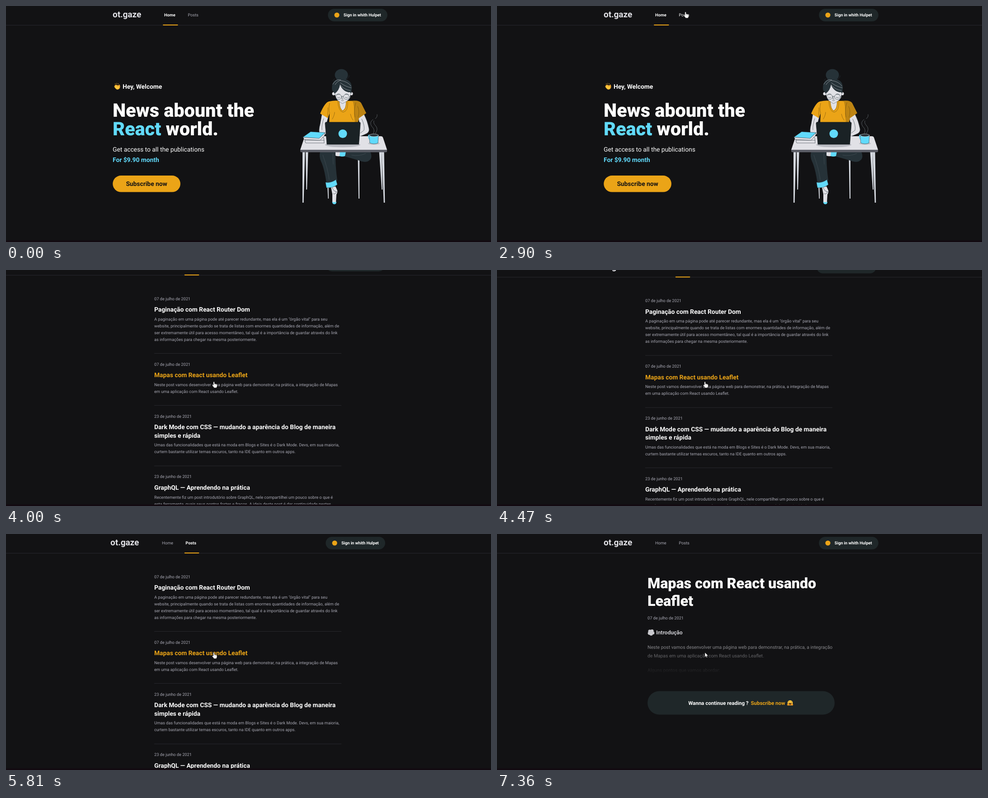
These frames come from a looping animation (1073x522 px, 8 s). An HTML page:

```html
<!DOCTYPE html>
<html lang="pt">
<head>
<meta charset="utf-8">
<title>ot.gaze</title>
<style>
  html, body { margin: 0; width: 100%; height: 100%; overflow: hidden; background: #121214; }
  svg { display: block; width: 100vw; height: 100vh; }
  text { font-family: Roboto, Arial, sans-serif; text-rendering: geometricPrecision; white-space: pre; }
</style>
</head>
<body>
<svg id="stage" viewBox="0 0 1073 522" xmlns="http://www.w3.org/2000/svg">
  <defs>
    <linearGradient id="fade" gradientUnits="userSpaceOnUse" x1="0" y1="206" x2="0" y2="310">
      <stop offset="0" stop-color="#e1e1e6"/>
      <stop offset="1" stop-color="#e1e1e6" stop-opacity="0"/>
    </linearGradient>
    <g id="desk-scene" stroke-linejoin="round" stroke-linecap="round">
      <!-- chair and table legs -->
      <g fill="#d5d9e0">
        <path d="M778.500 338h3.500l0 88h-2z M711 398h2.600l.4 28h-1.600z"/>
        <path d="M663 322h5.500l-2.500 84h-1.800z M825.500 322h5.500l2 84h-1.800z"/>
        <path d="M656 322h5.500l-3 113h-2.600z M831 322h5.500l1.800 113h-2.600z"/>
      </g>
      <!-- legs -->
      <path fill="#263238" d="M750 322H806Q812 336 803 342Q796 348 779 341L750 333Z"/>
      <path fill="#e1e1e6" d="M728 322h12l-1 10q-6 1-10-1z"/>
      <path fill="#61dafb" d="M739 322h13l-2 10q-6 2-12 0z"/>
      <path fill="#263238" d="M695 322H729Q728 350 733 386L709 392Q704 358 697 344Q692 333 695 322Z"/>
      <path fill="none" stroke="#4a575d" stroke-width=".6" d="M701 330Q712 360 715 384M723 327L724 350M765 330Q782 333 796 326"/>
      <path fill="#e1e1e6" d="M719 401l10-2 4 9q1 4-2 9l-1 17q-4 3-8 0l0-18z"/>
      <path fill="none" stroke="#263238" stroke-width=".7" d="M722 402q2 8 10 9M724 415q3 3 7-3"/>
      <path fill="#61dafb" d="M721.500 433q4.500 2 9.500 0q0 5-4 5.500q-5 0-5.500-5.500z"/>
      <path fill="#61dafb" stroke="#263238" stroke-width=".5" d="M707 390q12 2 23-6l3 11q-9 8-24 7z"/>
      <!-- arms -->
      <g fill="#e1e1e6" stroke="#263238" stroke-width=".6">
        <path d="M699 239l14 7q-5 14-4 26l-1 12-14-1q-3-8 1-22z"/>
        <path d="M779 247l13-8q8 16 11 32q2 9-9 13l-12 5-1-15q3-12-2-27z"/>
        <path fill="none" d="M703 249q-5 14-4 25M787 250q7 14 5 25l-8 6"/>
      </g>
      <!-- shirt -->
      <path fill="#bd8413" d="M760 210Q782 207 786 215L797 237 781 248 778 260H766Z"/>
      <path fill="#eba417" d="M715 211Q728 208 738 210H752Q764 209 768 212Q771 226 770 238L772 260H715L716 237 712 248 695 238Q706 212 715 211Z"/>
      <path fill="none" stroke="#6b4a0b" stroke-width=".6" d="M716 215q-3 12 0 22M711 246q2-15 1-21M774 214q-5 12-2 32M778 222q5 10 1 24M722 250q5-9 5-15M768 253q-5-7-6-14"/>
      <path fill="#e1e1e6" d="M738 208V214Q739 228 745 231Q752 227 752 213V208Z"/>
      <path fill="none" stroke="#7c5810" stroke-width=".7" d="M737 210Q738 229 745 232Q753 229 753 210M734 211Q736 234 746 235Q757 233 756 211"/>
      <!-- head -->
      <circle cx="725" cy="194" r="3.500" fill="#e1e1e6"/>
      <circle cx="764" cy="194" r="3.500" fill="#e1e1e6"/>
      <path fill="#e1e1e6" stroke="#37444a" stroke-width=".5" d="M727 184Q727 202 734 209L744 216Q756 211 761 203L764 184 739 174Z"/>
      <ellipse cx="742" cy="152.500" rx="14.500" ry="13" fill="#263238"/>
      <path fill="#263238" d="M721 182Q721 160 742 161Q765 161 765 181L764 194Q761 189 759 191Q745 189 739 174Q737 187 727 194L725 190Q721 188 721 182Z"/>
      <path fill="none" stroke="#263238" stroke-width=".8" d="M754 161q5-2 5-7M727 161l-4 4"/>
      <path fill="none" stroke="#c9ccd1" stroke-width=".6" d="M723 173Q731 160 741 164Q733 166 728 174M741 165Q756 167 763 177M740 170Q750 178 764 181M739 174Q747 185 762 187"/>
      <g fill="none" stroke="#37444a" stroke-width=".7">
        <ellipse cx="736" cy="201" rx="6.500" ry="5.500"/>
        <ellipse cx="753" cy="201" rx="6.500" ry="5.500"/>
        <path d="M742 200q2-1 4.500 0M731 196q4-3 8-1M750 195q4-2 8 1M733 202q3 2 6 0M750 202q3 2 6 0M744 201l-1 5h3M742 209q3 1 5 0"/>
      </g>
      <!-- table -->
      <path fill="#e1e1e6" d="M664 288H829Q833 288 834 291L843 318H651L660 291Q661 288 664 288Z"/>
      <path fill="#5b5d66" d="M651 318H843V321Q843 323.500 840 323.500H654Q651 323.500 651 321Z"/>
      <ellipse cx="745" cy="307" rx="39" ry="5.500" fill="#b9bbc2"/>
      <ellipse cx="814" cy="304" rx="13" ry="3" fill="#c2c4ca"/>
      <!-- laptop -->
      <path fill="#1a2225" stroke="#0f1517" stroke-width=".7" d="M708 257H782Q784.500 257 784 260L780.500 306H710L706 260Q706 257 708 257Z"/>
      <circle cx="745" cy="282.500" r="9.500" fill="#61dafb"/>
      <!-- books -->
      <g stroke="#263238" stroke-width=".6">
        <path fill="#e1e1e6" d="M662 293L703 291 704 303H663Q660 298 662 293Z"/>
        <path fill="none" d="M662 297H704"/>
        <path fill="#e1e1e6" d="M657 290L693 292 706 280 705 286 695 297 660 295Z"/>
        <path fill="#61dafb" d="M657 290L674 278 706 280 693 292.500Z"/>
      </g>
      <!-- mug and steam -->
      <path fill="none" stroke="#61dafb" stroke-width="2" d="M806 286q-5-2-4 4q1 6 6 6"/>
      <path fill="#61dafb" stroke="#263238" stroke-width=".6" d="M804 286H824L823 303Q814 307 805 303Z"/>
      <ellipse cx="814" cy="286" rx="10" ry="3" fill="#263238" stroke="#e1e1e6" stroke-width=".7"/>
      <path fill="none" stroke="#71797d" stroke-width=".7" d="M812 283Q818 274 809 266Q803 257 812 251M817 249Q822 246 821 240M817 282Q825 272 817 264Q812 259 814 254"/>
    </g>
    <g id="clap">
      <path fill="#f0a32b" d="M241 175.500L244 174 249 176 250 173.500Q252.500 174 252.500 179Q252 184 247 184.500Z"/>
      <path fill="#ffc83d" stroke="#c87a12" stroke-width=".4" d="M239.300 178Q239.500 176.600 241 177.500L240.600 175.500Q241.500 174 243 175.300L247.500 178.300 248 175.600Q250 175 251 178.500Q251.500 184 246.500 184.800Q243 184.500 239.300 178Z"/>
      <path stroke="#ffc83d" stroke-width="1" fill="none" d="M241.500 171.500l.8 1.500M245 170.500v1.700M248.600 171.300l-.8 1.600"/>
    </g>
    <g id="hug">
      <circle cx="648.500" cy="373.500" r="5.800" fill="#ffc83d"/>
      <path d="M645 374h7q0 4-3.500 4t-3.500-4z" fill="#6b3d14"/>
      <path d="M645 372q1-2 2.200 0M650 372q1-2 2.200 0" fill="none" stroke="#6b3d14" stroke-width=".8"/>
      <ellipse cx="644.500" cy="377.500" rx="2.600" ry="2" fill="#f59b23"/>
      <ellipse cx="652.500" cy="377.500" rx="2.600" ry="2" fill="#f59b23"/>
    </g>
  </defs>
  <g id="home"></g>
  <g id="posts"></g>
  <g id="post"></g>
  <rect y="518.500" width="1073" height="3.500" fill="#120a10"/>
  <circle id="press" r="7" fill="#ff0" fill-opacity=".47"/>
  <g id="arrow">
    <path d="M0 0V10.200L2.400 8 4 11.300 5.500 10.600 4 7.400H7.200Z" fill="#fff" stroke="#000" stroke-width=".5"/>
  </g>
  <g id="hand">
    <path d="M-1.300 1Q-1.300 0 0 0T1.300 1V4.600Q2.400 3.900 3.300 5 4.500 4.300 5.200 5.500 7.200 5.200 7.200 7V9.800Q7 11.500 6 12.500V13.800H-.2V12.500Q-2.600 10 -3.600 8.200-4 6.600-2.500 6.800L-1.300 7.800Z" fill="#fff" stroke="#000" stroke-width=".6"/>
    <path d="M1.300 5V8M3.300 5.500V8M5.200 6V8" stroke="#555" stroke-width=".4"/>
  </g>
</svg>
<script>
const $ = id => document.getElementById(id);
const GOLD = '#eba417', GRAY = '#a8a8b3', CYAN = '#61dafb', LIGHT = '#e1e1e6';
const SMALL = 9.2, MID = 13.8;

const text = (x, y, size, weight, fill, str, id = '') =>
  `<text x="${x}" y="${y}" font-size="${size}" font-weight="${weight}" fill="${fill}"${id && ` id="${id}"`}>${str}</text>`;
const rect = (x, y, w, h, r, fill, id = '') =>
  `<rect x="${x}" y="${y}" width="${w}" height="${h}" rx="${r}" fill="${fill}"${id && ` id="${id}"`}/>`;

function header(dx, active) {
  const link = (name, x) => {
    const on = name === active;
    return text(x, 23.2, SMALL, on ? 700 : 400, on ? '#fff' : GRAY, name, (active || 'Post') + name);
  };
  const bar = { Home: [347, 33.5], Posts: [399.6, 32.6] }[active];
  return rect(0, 42.1, 1073, .7, 0, '#323238') +
    `<g transform="translate(${dx})">` +
    text(236, 25, 18.9, 700, LIGHT, 'ot.gaze') +
    link('Home', 350) + link('Posts', 402.2) +
    (bar ? rect(bar[0], 41.1, bar[1], 1.8, .8, GOLD) : '') +
    rect(712.2, 6.2, 131.6, 27.8, 13.9, '#1f2729') +
    `<circle cx="732" cy="20" r="5.6" fill="${GOLD}"/>` +
    text(746.8, 23.2, SMALL, 700, '#fff', 'Sign in whith Hulpet') + '</g>';
}

$('home').innerHTML = header(0, 'Home') +
  '<use href="#clap"/>' +
  text(258, 182.8, MID, 700, '#fff', 'Hey, Welcome') +
  text(236, 244.8, 41.4, 900, '#fff', 'News abount the') +
  text(236, 286.2, 41.4, 900, '#fff', `<tspan fill="${CYAN}">React</tspan> world.`) +
  text(236, 322, MID, 400, '#fff', 'Get access to all the publications') +
  text(236, 345.2, MID, 700, CYAN, 'For $9.90 month') +
  rect(236.2, 375, 149.6, 36.6, 18.3, GOLD, 'buy') +
  text(265.4, 398, MID, 700, '#121214', 'Subscribe now') +
  '<use href="#desk-scene"/>';

const list = [
  ['07 de julho de 2021', ['Paginação com React Router Dom'], [
    'A paginação em uma página pode até parecer redundante, mas ela é um "órgão vital" para seu',
    'website, principalmente quando se trata de listas com enormes quantidades de informação, além de',
    'ser extremamente útil para acesso momentâneo, tal qual é a importância de guardar através do link',
    'as informações para chegar na mesma posteriormente.']],
  ['07 de julho de 2021', ['Mapas com React usando Leaflet'], [
    'Neste post vamos desenvolver uma página web para demonstrar, na prática, a integração de Mapas',
    'em uma aplicação com React usando Leaflet.']],
  ['23 de junho de 2021', ['Dark Mode com CSS — mudando a aparência do Blog de maneira', 'simples e rápida'], [
    'Umas das funcionalidades que está na moda em Blogs e Sites é o Dark Mode. Devs, em sua maioria,',
    'curtem bastante utilizar temas escuros, tanto na IDE quanto em outros apps.']],
  ['23 de junho de 2021', ['GraphQL — Aprendendo na prática'], [
    'Recentemente fiz um post introdutório sobre GraphQL, nele compartilhei um pouco sobre o que é',
    'esta ferramenta, quais seus pontos fortes e fracos. A ideia deste post é dar continuidade nestes',
    'estudos.']]
];

function postList() {
  let y = 97.7, out = '';
  list.forEach(([date, title, body], i) => {
    out += text(328, y, SMALL, 400, GRAY, date);
    y += 25.3;
    title.forEach((line, k) => out += text(328, y + k * 18.4, MID, 700, '#fff', line, k ? '' : 'title' + i));
    y += (title.length - 1) * 18.4 + 19.8;
    body.forEach((line, k) => out += text(328, y + k * 14.95, SMALL, 400, GRAY, line));
    y += (body.length - 1) * 14.95 + 27.8;
    out += rect(328, y - .3, 414, .7, 0, '#323238');
    y += 27.3;
  });
  return out;
}
$('posts').innerHTML = header(-4.9, 'Posts') + postList();

const cloud = [[338, 215, 3.6], [343, 214.5, 3.6], [345, 219, 3.2], [341, 221, 3.8], [337, 219.5, 3.4]];
$('post').innerHTML = header(0, '') +
  text(333, 120, 32.2, 900, '#fff', 'Mapas com React usando') +
  text(333, 158.6, 32.2, 900, '#fff', 'Leaflet') +
  text(333, 188.5, SMALL, 400, GRAY, '07 de julho de 2021') +
  `<g fill="#c9c9ce">${cloud.map(([x, y, r]) => `<circle cx="${x}" cy="${y}" r="${r}"/>`).join('')}</g>` +
  text(352, 222.4, 12.1, 700, 'url(#fade)', 'Introdução') +
  text(333, 254.3, 10.35, 400, 'url(#fade)', 'Neste post vamos desenvolver uma página web para demonstrar, na prática, a integração') +
  text(333, 272.7, 10.35, 400, 'url(#fade)', 'de Mapas em uma aplicação com React usando Leaflet.') +
  text(333, 304.6, 10.35, 400, 'url(#fade)', 'Alguns pontos que vamos abordar:') +
  rect(333, 347.4, 414, 52.2, 26.1, '#1f2729') +
  text(423.2, 378, 11.5, 700, '#fff', 'Wanna continue reading ?') +
  text(561.4, 378, 11.5, 700, GOLD, 'Subscribe now') +
  '<use href="#hug"/>';

// Pointer moves: start time, spacing, then x, y, shape for every step
const moves = [
  [380, 80, [984, 456, 'arrow'], [936, 430, 'arrow'], [872, 398, 'arrow'], [830, 380, 'arrow']],
  [850, 77.5, [760, 372, 'arrow'], [630, 367, 'arrow'], [470, 369, 'arrow'], [330, 380, 'hand'], [205, 386, 'arrow'],
    [149, 391, 'arrow'], [238, 394, 'hand'], [308, 396, 'hand'], [324.5, 397, 'hand']],
  [1790, 78.8, [327, 388, 'hand'], [337, 350, 'arrow'], [350, 293, 'arrow'], [365, 226, 'arrow'], [380, 158, 'arrow'],
    [393, 96, 'arrow'], [404, 46, 'arrow'], [411, 14, 'hand'], [416, 2, 'hand'], [417, 13, 'hand']],
  [3600, 80, [419, 36, 'hand'], [434, 120, 'arrow'], [453, 212, 'hand'], [460, 247, 'hand']],
  [4860, 75, [460, 251, 'hand'], [460, 257, 'hand'], [459.7, 262, 'hand']],
  [7360, 0, [460, 262, 'arrow']]
];
const track = moves.flatMap(([start, gap, ...pts]) => pts.map((p, i) => [start + i * gap, ...p]));

// Values that hold until the next step
const scroll = [[0, 0], [3920, 5], [4000, 31], [4080, 52], [4150, 57.5], [4470, 26.5], [4550, 6], [4630, 0]];
const dim = [[0, 1], [1082, .93], [1160, 1], [1315, .93], [1392, .84], [1470, .8], [1868, .9], [1947, 1]];
const glow = [[0, 0], [3760, .12], [3840, .5], [3920, 1]];
const at = (steps, t) => steps.filter(s => s[0] <= t + .5).pop();
const mix = (a, b, k) => `rgb(${a.map((v, i) => Math.round(v + (b[i] - v) * k))})`;
const show = (id, on) => $(id).setAttribute('visibility', on ? 'visible' : 'hidden');
const place = (id, x, y) => $(id).setAttribute('transform', `translate(${x} ${y})`);
const gold = [235, 164, 23], white = [255, 255, 255];

function draw(t) {
  show('home', t < 3130);
  show('posts', t >= 3130 && t < 7280);
  show('post', t >= 7280);
  place('posts', 0, -at(scroll, t)[1]);
  $('buy').setAttribute('fill', mix([0, 0, 0], gold, at(dim, t)[1]));
  $('title1').setAttribute('fill', mix(white, gold, at(glow, t)[1]));
  $('HomePosts').setAttribute('fill', t >= 2341 ? '#fff' : GRAY);

  const [, x, y, shape] = at(track, t) || [];
  show('arrow', shape === 'arrow');
  show('hand', shape === 'hand');
  if (shape) { place(shape, x, y); place('press', x, y); }
  show('press', (t >= 2730 && t < 2900) || (t >= 5420 && t < 5490));
}

const t0 = performance.now();
function tick(now) {
  draw(Math.max(0, now - t0) % 8000);
  requestAnimationFrame(tick);
}
draw(0);
requestAnimationFrame(tick);
</script>
</body>
</html>
```
